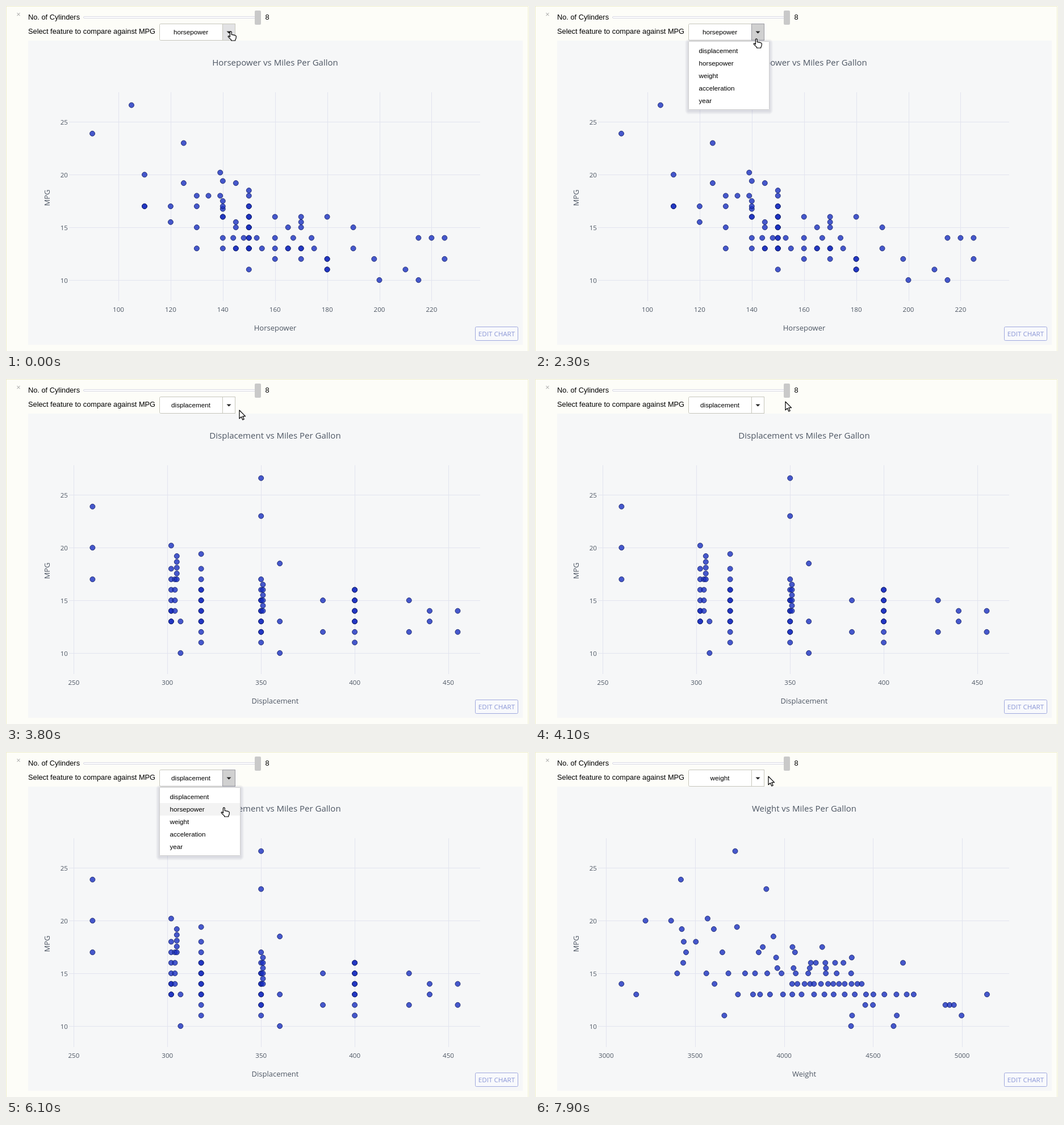
Animation, 921 px wide and 608 px high, one loop 8000 ms. Source, as an HTML page:

```html
<!DOCTYPE html>
<html lang="en">
<head>
<meta charset="utf-8">
<title>Feature comparison</title>
<style>
html, body { margin: 0; width: 100%; height: 100%; overflow: hidden; background: #fdfdf8; }
svg { display: block; width: 921px; height: 608px; }
.plot text { font-family: "Open Sans", sans-serif; font-size: 11.6px; fill: #4d5663; }
.plot .title { font-size: 15px; }
.plot .axis { font-size: 13px; }
.ui text { font-family: "Liberation Sans", Arial, sans-serif; font-size: 12.8px; fill: #000; }
.ui .small { font-size: 11.7px; }
.mid { text-anchor: middle; }
.end { text-anchor: end; }
.grid { stroke: #e2e4ef; fill: none; }
.dot { fill: #1a30c0; fill-opacity: .8; stroke: #101c60; stroke-opacity: .8; }
.cursor path { fill: #fff; stroke: #000; stroke-width: 1.2; stroke-linejoin: round; }
</style>
</head>
<body>
<svg viewBox="0 0 921 608" id="stage"></svg>
<script>
const NS = "http://www.w3.org/2000/svg";
const stage = document.getElementById("stage");

function add(parent, tag, attrs = {}, text) {
  const el = document.createElementNS(NS, tag);
  for (const k in attrs) el.setAttribute(k, attrs[k]);
  if (text !== undefined) el.textContent = text;
  return parent.appendChild(el);
}
const group = (parent, cls) => add(parent, "g", { class: cls });
const rect = (parent, x, y, width, height, attrs) => add(parent, "rect", { x, y, width, height, ...attrs });
const label = (parent, x, y, text, cls = "") => add(parent, "text", { x, y, class: cls }, text);
const show = (el, on) => { el.style.display = on ? "" : "none"; };

// Seeded random numbers in 0..1
let seed = 7;
const random = () => (seed = seed * 16807 % 2147483647) / 2147483647;

// Point rules: evenly stepped columns and rows, and jittered rows
function* range(from, to, step) {
  for (let v = from; v <= to + 1e-6; v += step) yield v;
}
const col = (x, low, high, step = 1) => [...range(low, high, step)].map(m => [x, m]);
const row = (m, from, to, step = to - from) => [...range(from, to, step)].map(x => [x, m]);
const scatter = (m, from, to, step) =>
  row(m, from, to, step).map(([x, y]) => [x + (random() - .5) * step * .5, y]);

const topMpg = [26.6, 23.9, 23, 20.2, 19.4, 18.5];

const horsepower = {
  name: "Horsepower", from: 100, step: 20, ticks: 7, x0: 198, gap: 91.9,
  top: [105, 90, 125, 139, 140, 150],
  points: [
    ...[130, 145, 150, 165, 170, 190].flatMap(x => col(x, 13, 15, 2)),
    ...col(150, 13, 18), ...col(150, 13, 16), ...col(140, 16, 17.5, .75),
    ...col(180, 11, 12), ...col(110, 17, 20, 3),
    ...row(10, 200, 215), ...row(11, 150, 210, 30), ...row(12, 160, 180, 10), ...row(12, 198, 225),
    ...row(13, 140, 175, 5), ...row(14, 140, 150, 4), ...row(14, 153, 175, 7), ...row(14, 215, 225, 5),
    ...row(15.5, 120, 190, 25), ...row(16, 140, 180, 10),
    ...row(17, 110, 150, 10), ...row(18, 130, 139, 4.5), ...row(19.2, 125, 145)
  ]
};

const displacement = {
  name: "Displacement", from: 250, step: 50, ticks: 5, x0: 119.4, gap: 164.9,
  top: [350, 260, 350, 302, 318, 360],
  points: [
    ...col(260, 17, 20, 3), ...col(302, 13, 18), ...col(302, 13, 14), ...col(304, 14, 17),
    ...col(305, 17, 19.2, .55), ...col(318, 11, 18), ...col(318, 13, 16),
    ...col(350, 11, 17), ...col(350, 12, 15), ...col(351, 14, 16.5, .5),
    ...col(400, 11, 16), ...col(400, 13, 16),
    ...[307, 360].flatMap(x => col(x, 10, 13, 3)),
    ...[383, 429].flatMap(x => col(x, 12, 15, 3)),
    ...col(440, 13, 14), ...col(455, 12, 14, 2)
  ]
};

const weight = {
  name: "Weight", from: 3000, step: 500, ticks: 5, x0: 125.3, gap: 156.7,
  top: [3725, 3420, 3900, 3570, 3735, 3940],
  points: [
    ...scatter(13, 3755, 4746, 58), ...scatter(14, 4042, 4464, 33),
    ...scatter(15, 3693, 4440, 75), ...scatter(16, 4141, 4335, 48),
    ...row(10, 4376, 4615), ...row(11, 3664, 4382), ...row(11, 4633, 4997),
    ...row(12, 4456, 4499), ...row(12, 4906, 4954, 24), ...row(13, 3169, 5140),
    ...row(14, 3086, 3609), ...row(15, 3399, 3563), ...row(15.5, 3962, 4325, 91),
    ...row(16, 3433, 4668), ...row(16.5, 3955, 4380), ...row(17, 3449, 4061, 204),
    ...row(17.5, 3880, 4215, 167), ...row(18, 3436, 3504), ...row(19.2, 3425, 3605),
    ...row(20, 3221, 3365)
  ]
};

const mpgY = m => 204.4 + (25 - m) * 18.57;

function buildChart({ name, from, step, ticks, x0, gap, top, points }) {
  const g = group(stage, "plot");
  for (let i = 0; i < ticks; i++) {
    const x = x0 + i * gap;
    add(g, "path", { class: "grid", d: `M${Math.round(x) + .5} 152V520` });
    label(g, x, 539, from + i * step, "mid");
  }
  for (const m of range(10, 25, 5)) {
    add(g, "path", { class: "grid", d: `M111 ${Math.round(mpgY(m)) + .5}H835` });
    label(g, 109, mpgY(m) + 5, m, "end");
  }
  for (const [v, m] of [...points, ...top.map((v, i) => [v, topMpg[i]])]) {
    add(g, "circle", { class: "dot", cx: x0 + (v - from) / step * gap, cy: mpgY(m), r: 4.5 });
  }
  label(g, 474, 105, `${name} vs Miles Per Gallon`, "title mid");
  label(g, 474, 572, name, "axis mid");
  add(g, "text", { class: "axis mid", transform: "translate(77 338) rotate(-90)" }, "MPG");
  return g;
}

// Page and chart panel
rect(stage, 0, 0, 921, 608, { fill: "#fdfdf8" });
add(stage, "path", { d: "M0 .5H919.5V608M.5 0V608", fill: "none", stroke: "#efeecd" });
rect(stage, 39, 61, 871, 536, { fill: "#f6f7f8" });

const charts = [horsepower, displacement, weight].map(buildChart);

const edit = group(stage, "plot");
rect(edit, 826.5, 565.5, 75, 24, { rx: 2, fill: "#f8f9fc", stroke: "#a0a9de" });
label(edit, 864, 581.5, "EDIT CHART", "mid").style.fill = "#8b97d6";

const tools = group(stage, "tools");
for (const x of range(620, 896, 30.6)) {
  rect(tools, x - 5, 67, 10, 11, { fill: "#dfe2ee", opacity: .4 });
}

// Widgets
const ui = group(stage, "ui");
label(ui, 22, 19, "×", "mid").style.fill = "#aaa";
label(ui, 39, 24, "No. of Cylinders");
rect(ui, 136.5, 18.5, 308, 3, { rx: 1.5, fill: "#fff", stroke: "#d8d8e4" });
rect(ui, 438, 8, 11, 25, { rx: 2, fill: "#c9c9c9" });
label(ui, 456.5, 24, "8");
label(ui, 39, 49, "Select feature to compare against MPG");

rect(ui, 270.5, 31.5, 133, 29, { rx: 2, fill: "#fff", stroke: "#c6c6bc" });
const caret = rect(ui, 381.5, 31.5, 22, 29);
add(ui, "path", { d: "M388.5 44.5h8l-4 4z", fill: "#222" });
const choice = label(ui, 325.5, 50, "", "small mid");

const menu = group(ui, "menu");
for (let i = 6; i > 0; i--) {
  rect(menu, 270 - i, 64 - i, 143 + 2 * i, 121 + 2 * i, { rx: i + 1, fill: "#303050", opacity: .022 });
}
rect(menu, 270.5, 62.5, 142, 120, { rx: 1, fill: "#fff", stroke: "#cfcfcf" });
const hoverRow = rect(menu, 271, 68, 141, 22, { fill: "#f3f3f3" });
["displacement", "horsepower", "weight", "acceleration", "year"]
  .forEach((s, i) => label(menu, 288.5, 83 + i * 22, s, "small"));

const cursor = group(stage, "cursor");
const arrow = add(cursor, "path", { d: "M0 0V14.8L3.4 11.6 5.8 17 8.2 16 5.8 10.7H10.5Z" });
const hand = add(cursor, "path", {
  d: "M-1.6 9.5V1.2a1.4 1.4 0 0 1 2.8 0V5.4l2.6.4 2.5.6 2.2.8q1 .5.9 1.8l-.5 3.4-1.2 2.4V16H.6V14.6" +
     "L-4.6 9.6q-.6-1.4.6-1.7 1 0 2.4 1.6Z"
});

// Timeline: cursor stops as [ms, x, y]
const LOOP = 8000, TICK = 100;
const stops = [
  [0, 396, 45], [800, 396, 45], [1300, 412, 24], [1700, 391, 45], [2000, 391, 45],
  [2300, 390, 58], [2900, 353, 79], [3300, 362, 81], [4100, 441, 40], [4700, 398, 46],
  [5100, 395, 48], [5600, 384, 98], [6100, 384, 98], [6400, 352, 120], [6700, 349, 122],
  [7800, 419, 47], [7900, 411, 43], [LOOP, 411, 43]
];
const choices = [[0, "horsepower"], [2900, "displacement"], [6400, "weight"]];
const chartTimes = [[0, 0], [3700, 1], [7100, 2]];
const openSpans = [[2100, 2900], [4800, 6400]];

const at = (steps, t) => steps.filter(s => s[0] <= t).pop()[1];
const within = (v, [a, b]) => v >= a && v < b;

function cursorAt(t) {
  const i = stops.findIndex(s => s[0] > t);
  const [t0, x0, y0] = stops[i - 1], [t1, x1, y1] = stops[i];
  const k = (t - t0) / (t1 - t0);
  return [Math.round(x0 + (x1 - x0) * k), Math.round(y0 + (y1 - y0) * k)];
}

function draw(now) {
  const t = Math.floor(now % LOOP / TICK) * TICK;
  const [x, y] = cursorAt(t);
  const open = openSpans.some(s => within(t, s));
  const onCaret = within(x, [381, 404]) && within(y, [31, 61]);
  const onMenu = open && within(x, [271, 412]) && within(y, [68, 178]);

  const current = at(chartTimes, t);
  charts.forEach((g, i) => show(g, i === current));
  choice.textContent = at(choices, t);
  show(menu, open);
  show(hoverRow, onMenu);
  hoverRow.setAttribute("y", 68 + Math.floor((y - 68) / 22) * 22);
  caret.setAttribute("fill", open ? "#d0d0d0" : onCaret ? "#e2e2e4" : "#fff");
  caret.setAttribute("stroke", open ? "#9c9ca4" : "#c6c6bc");
  show(tools, within(t, [6400, 7100]));

  cursor.setAttribute("transform", `translate(${x} ${y})`);
  show(hand, onCaret || onMenu);
  show(arrow, !(onCaret || onMenu));
}

function frame() {
  draw(performance.now());
  requestAnimationFrame(frame);
}
frame();
</script>
</body>
</html>
```
